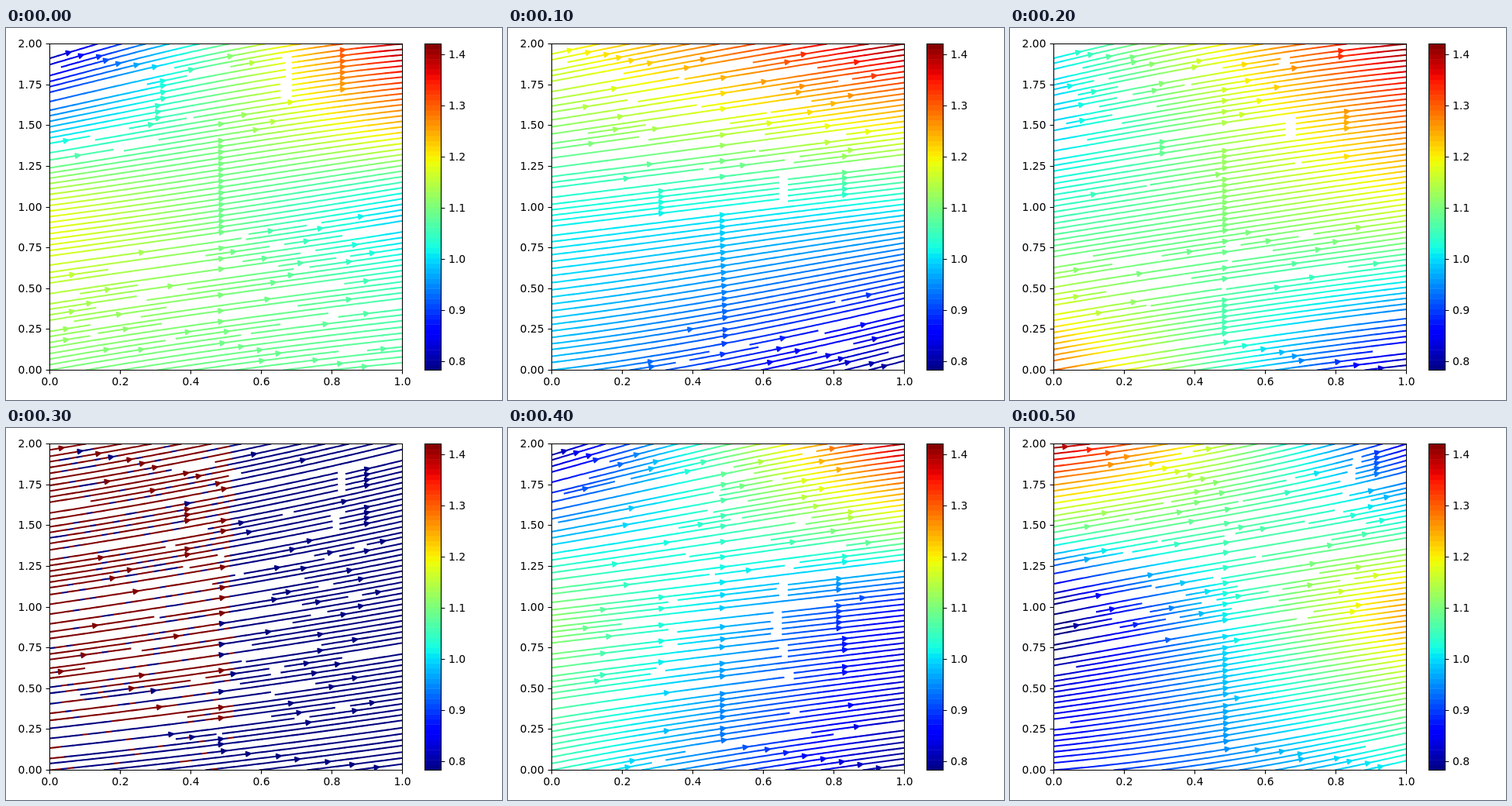
Recreate the animation shown at these times as an HTML page with a canvas. Size 640 by 480 pixels, loop 600 ms.

```html
<!DOCTYPE html>
<html lang="en">
<head>
<meta charset="utf-8">
<title>Flow field</title>
<style>
  html, body { margin: 0; width: 100%; height: 100%; overflow: hidden; background: #fff; }
  canvas, svg { position: absolute; left: 0; top: 0; width: 640px; height: 480px; }
  text { font: 13.89px "DejaVu Sans", Verdana, sans-serif; fill: #000; }
</style>
</head>
<body>
<canvas id="plot" width="640" height="480"></canvas>
<svg id="axes" viewBox="0 0 640 480"></svg>
<script>
const BOX = { x: 56.5, y: 20.5, w: 455, h: 421 };
const CELLS = 60, STEP = 1 / CELLS, MIN_LENGTH = 0.1, HOLD = 100;

// Per step: line slope and colour level on the left and right edges, bottom to top.
const STEPS = [
  { slope: [[.18, .15, .13, .2, .33], [.095, .125, .165, .118, .08]],
    level: [[.5, .58, .62, .3, 0], [.46, .42, .34, .72, 1]] },
  { slope: [[.12, .12, .12, .15, .22], [.27, .22, .12, .13, .145]],
    level: [[.31, .34, .38, .52, .63], [0, .17, .36, .67, 1]] },
  { slope: [[.18, .165, .16, .19, .26], [.115, .12, .14, .11, .09]],
    level: [[.8, .57, .41, .33, .36], [0, .33, .62, .8, 1]] },
  { slope: [[.1, .125, .145, .155, .165], [.13, .15, .175, .22, .25]], level: null },
  { slope: [[.2, .14, .115, .19, .33], [.13, .125, .108, .13, .12]],
    level: [[.43, .47, .51, .27, 0], [0, .06, .13, .58, 1]] },
  { slope: [[.08, .15, .2, .17, .1], [.24, .17, .13, .18, .31]],
    level: [[.14, .07, 0, .5, 1], [.36, .56, .75, .4, .08]] }
];

const clamp = (v, lo = 0, hi = 1) => Math.min(hi, Math.max(lo, v));
const inside = (x, y) => x >= 0 && x <= 1 && y >= 0 && y <= 1;
const toX = x => BOX.x + x * BOX.w;
const toY = y => BOX.y + (1 - y) * BOX.h;

function spline(a, t) {
  const n = a.length - 1, s = clamp(t) * n, i = Math.min(n - 1, Math.floor(s)), f = s - i;
  const p1 = a[i], p2 = a[i + 1];
  const p0 = i ? a[i - 1] : 2 * p1 - p2;
  const p3 = i + 2 <= n ? a[i + 2] : 2 * p2 - p1;
  return p1 + f / 2 * (p2 - p0 + f * (2 * p0 - 5 * p1 + 4 * p2 - p3 + f * (3 * (p1 - p2) + p3 - p0)));
}

const field = (edges, x, y) => spline(edges[0], y) * (1 - x) + spline(edges[1], y) * x;

function jet(t) {
  t = clamp(t);
  const up = (a, b) => clamp((t - a) / (b - a));
  const r = t > .89 ? 1 - up(.89, 1) / 2 : up(.35, .66);
  const g = t > .64 ? 1 - up(.64, .91) : up(.125, .375);
  const b = t > .34 ? 1 - up(.34, .65) : .5 + up(0, .11) / 2;
  return `rgb(${[r, g, b].map(v => Math.round(v * 255))})`;
}

// Uniform speed: only round-off separates the two ends of the scale.
function roundOff(x, y) {
  if (x > .508) return 0;
  const cell = Math.floor(x * 60) * 12.9898 + Math.floor(y * 75) * 78.233;
  const h = Math.sin(cell) * 43758.5453;
  const share = y < .15 ? .1 : y > .2 && y < .25 ? .35 : .84;
  return h - Math.floor(h) < share ? 1 : 0;
}

// Seeds run along the border and spiral inwards.
function* seeds() {
  let x = 0, y = 0, x0 = 0, y0 = 1, x1 = CELLS - 1, y1 = CELLS - 1, dir = 0;
  for (let i = 0; i < CELLS * CELLS; i++) {
    yield [x, y];
    if (dir === 0) { if (++x >= x1) { x1--; dir = 1; } }
    else if (dir === 1) { if (++y >= y1) { y1--; dir = 2; } }
    else if (dir === 2) { if (--x <= x0) { x0++; dir = 3; } }
    else if (--y <= y0) { y0++; dir = 0; }
  }
}

function streamlines(slope) {
  const used = new Uint8Array(CELLS * CELLS), lines = [];
  const cellOf = (x, y) => Math.round(y * (CELLS - 1)) * CELLS + Math.round(x * (CELLS - 1));

  function heading(x, y, sign) {
    const m = field(slope, x, y) * BOX.w / BOX.h, k = sign / Math.hypot(1, m);
    return [k, k * m];
  }

  function trace(x, y, sign, marked) {
    const pts = [];
    let cell = cellOf(x, y), length = 0;
    while (true) {
      let a, bx, by;
      if (inside(x, y)) {
        pts.push([x, y]);
        a = heading(x, y, sign);
        bx = x + a[0] * STEP;
        by = y + a[1] * STEP;
      }
      if (!a || !inside(bx, by)) {
        const [px, py] = pts[pts.length - 1], [dx, dy] = heading(px, py, sign);
        const d = Math.min(((dx > 0 ? 1 : 0) - px) / dx, ((dy > 0 ? 1 : 0) - py) / dy);
        pts.push([px + dx * d, py + dy * d]);
        return { pts, length: length + d };
      }
      const b = heading(bx, by, sign);
      x += STEP * (a[0] + b[0]) / 2;
      y += STEP * (a[1] + b[1]) / 2;
      if (inside(x, y)) {
        const next = cellOf(x, y);
        if (next !== cell) {
          if (used[next]) return { pts, length };
          used[next] = 1;
          marked.push(next);
          cell = next;
        }
      }
      length += STEP;
    }
  }

  for (const [cx, cy] of seeds()) {
    const start = cy * CELLS + cx;
    if (used[start]) continue;
    used[start] = 1;
    const marked = [start], x = cx / (CELLS - 1), y = cy / (CELLS - 1);
    const back = trace(x, y, -1, marked), ahead = trace(x, y, 1, marked);
    if (back.length + ahead.length > MIN_LENGTH)
      lines.push(back.pts.reverse().concat(ahead.pts.slice(1)));
    else
      marked.forEach(c => { used[c] = 0; });
  }
  return lines;
}

function middle(line) {
  const sums = [];
  let total = 0;
  for (let i = 1; i < line.length; i++) {
    total += Math.hypot(line[i][0] - line[i - 1][0], line[i][1] - line[i - 1][1]);
    sums.push(total);
  }
  return sums.findIndex(s => s >= total / 2);
}

function drawArrow(c, p, q) {
  const ax = toX(p[0]), ay = toY(p[1]), bx = toX(q[0]), by = toY(q[1]);
  c.save();
  c.translate((ax + bx) / 2, (ay + by) / 2);
  c.rotate(Math.atan2(by - ay, bx - ax));
  c.beginPath();
  c.moveTo(-2.33, 0);
  c.lineTo(-7.89, 2.78);
  c.lineTo(-7.89, -2.78);
  c.closePath();
  c.fill();
  c.stroke();
  c.restore();
}

function render({ slope, level }) {
  const sheet = document.createElement("canvas");
  sheet.width = 640;
  sheet.height = 480;
  const c = sheet.getContext("2d");
  c.beginPath();
  c.rect(BOX.x, BOX.y, BOX.w, BOX.h);
  c.clip();
  c.lineWidth = 2.08;
  c.lineJoin = "round";
  const colour = ([x, y]) => jet(level ? field(level, x, y) : roundOff(x, y));
  for (const line of streamlines(slope)) {
    for (let i = 0; i + 1 < line.length; i++) {
      const [p, q] = [line[i], line[i + 1]];
      const lap = i + 2 < line.length ? 1.06 : 1;
      c.strokeStyle = colour(p);
      c.beginPath();
      c.moveTo(toX(p[0]), toY(p[1]));
      c.lineTo(toX(p[0] + (q[0] - p[0]) * lap), toY(p[1] + (q[1] - p[1]) * lap));
      c.stroke();
    }
    const n = middle(line);
    c.fillStyle = c.strokeStyle = colour(line[n]);
    drawArrow(c, line[n], line[n + 1]);
  }
  return sheet;
}

function buildAxes() {
  const { x, y, w, h } = BOX, right = x + w, bottom = y + h;
  let bars = "", ticks = "", labels = "";
  const label = (tx, ty, anchor, s) => {
    labels += `<text x="${tx}" y="${ty}" text-anchor="${anchor}">${s}</text>`;
  };
  for (let i = 0; i <= 5; i++) {
    const tx = Math.floor(x + w * i / 5) + .5;
    ticks += `M${tx} ${bottom}v4.9`;
    label(tx, 461, "middle", (i / 5).toFixed(1));
  }
  for (let i = 0; i <= 8; i++) {
    const ty = Math.floor(bottom - h * i / 8) + .5;
    ticks += `M${x} ${ty}h-4.9`;
    label(46.5, ty + 4.5, "end", (i / 4).toFixed(2));
  }
  const bands = 64, bh = h / bands;
  for (let i = 0; i < bands; i++)
    bars += `<rect x="540.5" y="${bottom - (i + 1) * bh}" width="21" height="${bh + (i ? .5 : 0)}" fill="${jet((i + .5) / bands)}"/>`;
  for (let i = 0; i <= 6; i++) {
    const ty = Math.floor(430.2 - 66 * i) + .5;
    ticks += `M561.5 ${ty}h4.9`;
    label(571, ty + 4.5, "start", (.8 + i / 10).toFixed(1));
  }
  document.getElementById("axes").innerHTML = bars +
    `<path d="M${x} ${y}H${right}V${bottom}H${x}ZM540.5 ${y}h21v${h}h-21Z${ticks}" fill="none" stroke="#000" stroke-width="1.1"/>` + labels;
}

buildAxes();
const sheets = STEPS.map(render);
const view = document.getElementById("plot").getContext("2d");
const began = performance.now();
let shown = -1;

function tick() {
  const i = Math.floor((performance.now() - began) / HOLD) % sheets.length;
  if (i !== shown) {
    view.clearRect(0, 0, 640, 480);
    view.drawImage(sheets[i], 0, 0);
    shown = i;
  }
  requestAnimationFrame(tick);
}
tick();
</script>
</body>
</html>
```
